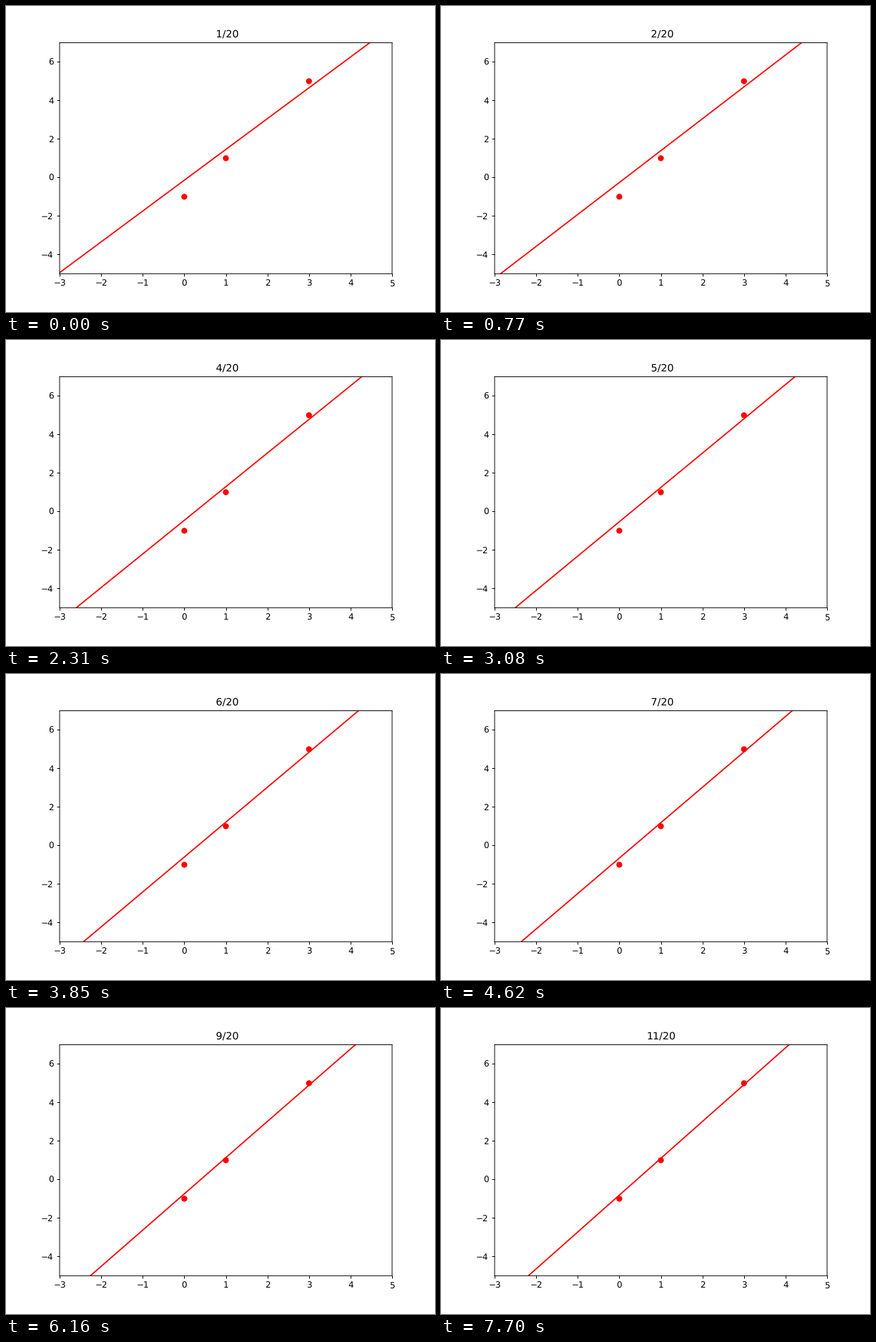
A matplotlib script for the animation above (8000 ms loop, 600x429 px).

```python
import matplotlib.pyplot as plt
import numpy as np
from matplotlib.animation import FuncAnimation
from matplotlib.patches import Ellipse

DPI = 600 / 7
STEP_MS = 770
LOOP_MS = 8000
INTERVAL = 40

# Error of the fit along the slow direction of gradient descent.
START_ERROR = 0.858
DECAY = 0.8585
SLOPE_RATIO = 0.466

# Dot diameter in pixels, and pixels per data unit on each axis.
DOT = 7 * DPI / 72
PX_X = 600 * 0.775 / 8
PX_Y = 429 * 0.755 / 12

plt.rcParams["font.family"] = "DejaVu Sans"
plt.rcParams["text.hinting"] = "none"
fig, ax = plt.subplots(figsize=(600.001 / DPI, 429.001 / DPI), dpi=DPI)
fig.subplots_adjust(left=0.125, right=0.9, bottom=0.125, top=0.88)
ax.set_xlim(-3, 5)
ax.set_ylim(-5, 7)
ax.set_xticks(range(-3, 6))
ax.set_yticks(range(-4, 7, 2))
ax.tick_params(axis="x", pad=3.1)
for spine in ax.spines.values():
    spine.set_snap(False)

# Ellipses keep the dots at their exact place between pixels.
for point in [(0, -1), (1, 1), (3, 5)]:
    ax.add_patch(Ellipse(point, DOT / PX_X, DOT / PX_Y, color="r", lw=0))

xs = np.array([-4.0, 6.0])
line, = ax.plot(xs, xs, "r-", lw=1.5)
title = ax.set_title("", pad=6.5)


def fit(step):
    """Slope and intercept, closing in on y = 2x - 1."""
    error = START_ERROR * DECAY ** step
    return 2 - SLOPE_RATIO * error, -1 + error


def update(i):
    step = (i * INTERVAL + INTERVAL - 1) // STEP_MS
    slope, intercept = fit(step)
    line.set_ydata(slope * xs + intercept)
    title.set_text(f"{step + 1:2}/20")
    return line, title


anim = FuncAnimation(fig, update, frames=LOOP_MS // INTERVAL,
                     interval=INTERVAL, repeat=True, repeat_delay=0)
plt.show()
```
